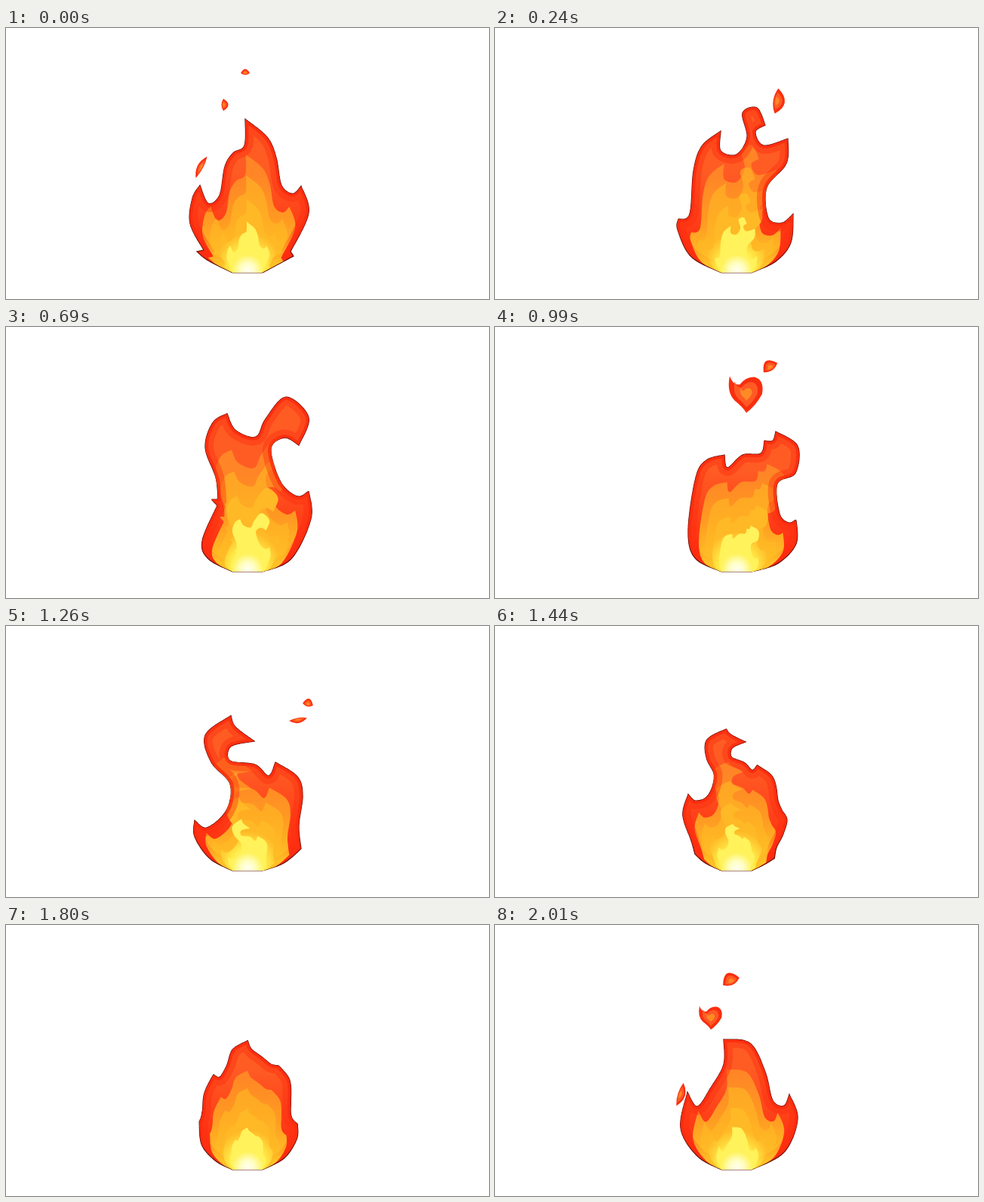
An HTML page that plays this animation: 640x360 px, repeating every 2.04 s.

```html
<!DOCTYPE html>
<html lang="en">
<head>
<meta charset="utf-8">
<title>Flame</title>
<style>
  html, body { margin: 0; width: 100%; height: 100%; overflow: hidden; background: #fff; }
  svg { display: block; width: 100%; height: 100%; }
</style>
</head>
<body>
<svg viewBox="0 0 640 360">
  <defs>
    <linearGradient id="red" gradientUnits="userSpaceOnUse" x1="0" y1="190" x2="0" y2="300">
      <stop offset="0" stop-color="#ff5c24"/>
      <stop offset="1" stop-color="#ff2c10"/>
    </linearGradient>
    <linearGradient id="rim" gradientUnits="userSpaceOnUse" x1="0" y1="270" x2="0" y2="312">
      <stop offset="0" stop-color="#fb2a0e"/>
      <stop offset="1" stop-color="#fb2a0e" stop-opacity="0"/>
    </linearGradient>
    <linearGradient id="orange" gradientUnits="userSpaceOnUse" x1="0" y1="155" x2="0" y2="315">
      <stop offset="0" stop-color="#ff8526"/>
      <stop offset=".5" stop-color="#ff9a22"/>
      <stop offset="1" stop-color="#ffc626"/>
    </linearGradient>
    <radialGradient id="yellow" gradientUnits="userSpaceOnUse" cx="321" cy="300" r="90">
      <stop offset="0" stop-color="#fffbb0"/>
      <stop offset=".5" stop-color="#ffec48"/>
      <stop offset="1" stop-color="#ffb826"/>
    </radialGradient>
    <radialGradient id="white" gradientUnits="userSpaceOnUse" cx="321" cy="300" r="58">
      <stop offset="0" stop-color="#fffff0"/>
      <stop offset=".45" stop-color="#fffec4"/>
      <stop offset="1" stop-color="#fff25a"/>
    </radialGradient>
    <path id="body"/>
    <clipPath id="inside"><use href="#body"/></clipPath>
  </defs>
  <g id="sparks"></g>
  <use href="#body" fill="url(#red)" stroke="#5a0800" stroke-width="1.2"/>
  <g clip-path="url(#inside)">
    <g id="layers"></g>
    <use href="#body" fill="none" stroke="url(#rim)" stroke-width="22" stroke-opacity=".4"/>
    <use href="#body" fill="none" stroke="url(#rim)" stroke-width="8" stroke-opacity=".8"/>
  </g>
</svg>
<script>
const LOOP = 2040, STEP = 30, FIRST_HOLD = 60;
const RISE = -0.2, GROW = 120, SHRINK = 160;

// Key points of the outline, clockwise from the base. A letter names a tip,
// which travels to the same letter in the next pose; * is an unnamed corner.
const poses = [
  [0, '268 309,253 297A,262 295*,244 260,247 226,257 209B,268 233,283 222,290 184,301 166,316 156,317 121C,346 145,358 172,365 209,380 220,391 210D,401 246,377 297*,381 303E'],
  [240, '260 304,242 268,243 254A,258 247,263 190,274 157,299 137B,299 163,320 168,334 145,328 113,347 106,358 129C,345 138,356 156,388 147D,386 180,360 212,362 252,380 259,395 247E,392 285,372 310'],
  [690, '268 308,260 284,280 237*,272 229F,281 229*,278 200,264 160,274 127,293 115A,304 137,331 146,344 122,371 93,401 120,388 157E,369 147,351 162,364 206,386 225,401 218G,404 255,378 308'],
  [990, '265 307,256 270,266 200,280 177,304 170F,308 187,328 170,352 168,357 151*,368 151,372 139G,401 158,398 194,374 208,377 248,389 260,399 256H,399 288,375 314'],
  [1260, '270 309,250 280,250 258I,266 268,292 245,297 210,272 181,264 145,298 119F,304 134,329 153G,298 160,297 179,330 184,348 199,357 181H,386 200,393 225,388 265,391 296J,368 315'],
  [1620, '273 312,257 295K,257 268,248 224,262 189I,272 203,284 186,297 158,335 155G,330 178,353 200,370 195J,390 212,388 245,380 272,383 298L,362 313'],
  [2010, '268 307,246 270,255 222K,268 241,286 216,303 185,303 152G,338 157,358 195,368 233,383 240,390 225L,401 258,383 302']
].map(([time, outline]) => ({ time, sections: sections(`300 325,${outline},340 325`) }));

// The same outline, shrunk towards the base, makes the inner flames.
const layers = [[.78, 'url(#orange)', 1], [.65, '#ffbd26', .55], [.5, 'url(#yellow)', 1], [.36, 'url(#white)', 1]];

const LEAF = 'M-1 0Q0 -1 1 0Q0 .4 -1 0Z';
const HEART = 'M-1 -.95Q-.8 -.45 -.4 -.5Q0 -.95 .5 -.9Q1.1 -.75 .95 0Q.6 .6 0 1Q-.2 .7 -.7 .35Q-1.2 -.1 -1 -.95Z';
const sparks = [
  { at: 0, x: 317, y: 60, w: 6, h: 11, turn: 0 },
  { at: 0, x: 288, y: 102, w: 8, h: 13, turn: 90 },
  { at: 0, x: 259, y: 185, w: 16, h: 11, turn: -62 },
  { at: 240, x: 373, y: 97, w: 17, h: 22, turn: 98 },
  { at: 990, x: 365, y: 54, w: 11, h: 21, turn: -34 },
  { at: 990, x: 333, y: 89, w: 22, h: 25, turn: 0, shape: HEART },
  { at: 1260, x: 400, y: 104, w: 7, h: 15, turn: 12 },
  { at: 1260, x: 387, y: 124, w: 12, h: 10, turn: 170 },
  { at: 1620, x: 375, y: 107, w: 12, h: 20, turn: 25 },
  { at: 2010, x: 313, y: 75, w: 12, h: 24, turn: -25 },
  { at: 2010, x: 286, y: 123, w: 15, h: 16, turn: 0, shape: HEART },
  { at: 2010, x: 245, y: 225, w: 16, h: 14, turn: 107 }
];
const shades = [['#f92e0f', 1], ['#ff5a24', .7], ['#ff8a26', .35]];

function lerp(a, b, k) { return a + (b - a) * k; }

// Catmull-Rom through an open run of points.
function smooth(run) {
  const out = [run[0]];
  for (let i = 0; i < run.length - 1; i++) {
    const a = run[i - 1] || run[i], b = run[i], c = run[i + 1], d = run[i + 2] || c;
    for (let u = .1; u < 1.05; u += .1) {
      out.push([0, 1].map(n => b[n] + u / 2 * (c[n] - a[n] +
        u * (2 * a[n] - 5 * b[n] + 4 * c[n] - d[n] + u * (3 * (b[n] - c[n]) + d[n] - a[n])))));
    }
  }
  return out;
}

// Smooth lines between corners, each with the name of the corner it ends in.
function sections(text) {
  const result = [];
  let run = [];
  for (const item of text.split(',')) {
    const point = item.split(' ').map(parseFloat);
    const [tip] = item.match(/[A-Z*]$/) || [];
    run.push(point);
    if (tip) {
      result.push({ tip, line: smooth(run) });
      run = [point];
    }
  }
  return [...result, { tip: 'end', line: smooth(run) }];
}

function resample(line, count) {
  const along = [0];
  for (let i = 1; i < line.length; i++)
    along.push(along[i - 1] + Math.hypot(line[i][0] - line[i - 1][0], line[i][1] - line[i - 1][1]));
  const total = along[along.length - 1];
  let i = 1;
  return Array.from({ length: count }, (_, n) => {
    const want = total * n / (count - 1);
    while (i < line.length - 1 && along[i] < want) i++;
    const k = (want - along[i - 1]) / (along[i] - along[i - 1] || 1);
    return [0, 1].map(axis => lerp(line[i - 1][axis], line[i][axis], k));
  });
}

// Split an outline at the given tips, with evenly spaced points in each part.
function splitAt(parts, tips) {
  let from = 0;
  return tips.flatMap(tip => {
    const to = parts.findIndex(part => part.tip === tip) + 1;
    const line = parts.slice(from, to).flatMap(part => part.line);
    from = to;
    return resample(line, 120);
  });
}

const morphs = poses.slice(1).map((next, i) => {
  const a = poses[i].sections, b = next.sections;
  const shared = a.map(part => part.tip).filter(tip => tip !== '*' && b.some(part => part.tip === tip));
  return { start: poses[i].time, end: next.time, from: splitAt(a, shared), to: splitAt(b, shared) };
});

function add(parent, tag, attributes) {
  const node = document.createElementNS('http://www.w3.org/2000/svg', tag);
  for (const name in attributes) node.setAttribute(name, attributes[name]);
  parent.append(node);
  return node;
}

const byId = id => document.getElementById(id);
for (const [size, fill, opacity] of layers)
  add(byId('layers'), 'use', { href: '#body', fill, opacity,
    transform: `translate(320 334) scale(${size}) translate(-320 -334)` });

for (const spark of sparks) {
  spark.node = add(byId('sparks'), 'g', {});
  for (const [fill, size] of shades)
    add(spark.node, 'path', { d: spark.shape || LEAF, fill, transform: `scale(${spark.w * size} ${spark.h * size})` });
}

function drawSpark({ at, x, y, turn, node }, t) {
  const age = t - at;
  const shown = age > -GROW && age < SHRINK;
  node.setAttribute('display', shown ? 'inline' : 'none');
  if (!shown) return;
  const size = age < 0 ? 1 + age / GROW / 2 : Math.sqrt(1 - age / SHRINK);
  node.setAttribute('transform', `translate(${x} ${y + RISE * age}) rotate(${turn}) scale(${size})`);
}

function draw(t) {
  const { start, end, from, to } = morphs.find(morph => t <= morph.end);
  const k = (t - start) / (end - start);
  const points = from.map((p, i) => [0, 1].map(n => lerp(p[n], to[i][n], k).toFixed(1)).join(' '));
  byId('body').setAttribute('d', `M${points.join('L')}Z`);
  sparks.forEach(spark => drawSpark(spark, t));
}

const began = performance.now();
function tick() {
  const t = Math.floor((performance.now() - began) % LOOP / STEP) * STEP;
  draw(t < FIRST_HOLD ? 0 : t);
  requestAnimationFrame(tick);
}
tick();
</script>
</body>
</html>
```
